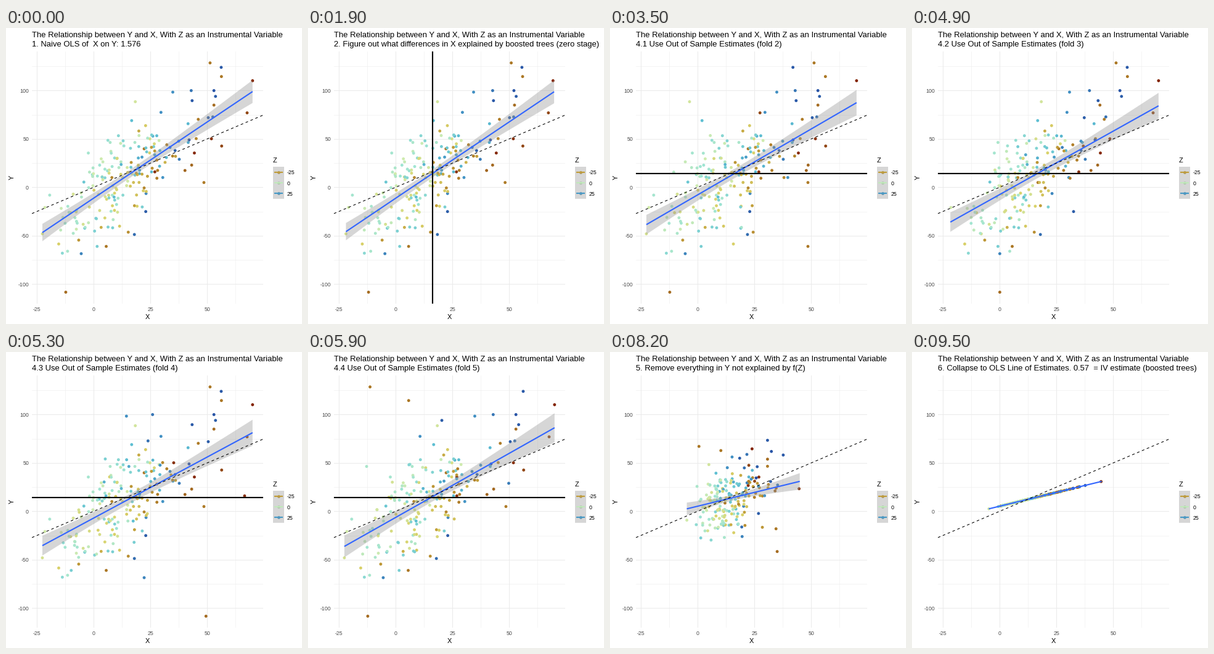
Recreate the animation shown at these times as a matplotlib script. Size 480x480 px, loop 10000 ms.

```python
import numpy as np
import matplotlib.pyplot as plt
from matplotlib.animation import FuncAnimation
from matplotlib.colors import LinearSegmentedColormap
from matplotlib.patches import Polygon, Rectangle

SIZE, DPI = 480, 96
PT = 72 / DPI  # points per pixel
FRAMES, INTERVAL = 100, 100
LEFT, RIGHT, TOP, BOTTOM = 42, 417, 38, 447
XLIM, YLIM = (-27.1, 74.66), (-120.15, 140.45)
MEAN_X, MEAN_Y = 16.2, 14.3

plt.rcParams["font.family"] = "Liberation Sans"
roma = LinearSegmentedColormap.from_list("roma", [
    "#7E1900", "#965318", "#AC7825", "#C3A23C", "#D9D26A", "#D0EBAE",
    "#A1E5D2", "#5FC0D2", "#4292C4", "#2F64AC", "#1A3399"])


def shade(z):
    return roma((np.asarray(z) + 54) / 101)


# Outlying points per fold: x, y, z, predicted x
OUTER = {
    1: [(70, 110.2, -52, 30), (53, 100, 40, 45), (-13.7, -68, 10, -1.8),
        (-6.5, -54.5, -26, 38), (46.1, 70.3, -33, 42), (-21.4, -20.8, -4, -20.6)],
    2: [(56.2, 124, 39, 42), (67.6, 77, -46, 27.5), (18.4, 88.5, -6, -3.5),
        (43.2, 23, -38, 48.7), (5.6, -61, -34, 48.6), (-15.3, -58.5, -14, 15.8),
        (18, -48.7, 35, 22), (15.3, -46.3, -28, 24.5), (16.8, 69, 17, 2)],
    3: [(53, 85, -37, 42), (56.4, 42.7, -46, 32), (-22.5, -48, -8, -4.4),
        (48.6, 5, -33, 9), (23, -25, 38, 35), (-11.4, -66, 5, 8.5),
        (50.5, 72, 38, 34)],
    4: [(43, 100, 33, 26), (34.9, 98.4, 27, 14.5), (52.5, 72.8, 34, 24),
        (51.9, 50.2, -50, 35.3), (-12.2, -108.3, -37, 49.5),
        (-5.4, -68.5, 30, 22.3), (1.6, -61, 13, -9.8), (27, 16, -50, 66.5)],
    5: [(51.3, 128.6, -34, -11.2), (56.3, 114.5, -34, 5.8), (53.7, 94, 38, 20.4),
        (43.4, 89.6, 39, 54.2), (29.7, 77.5, 27, 10.8), (44.4, 35.5, -51, 27)],
}


def make_data(total=200):
    rng = np.random.default_rng(12)
    rows = [(*p, k) for k, pts in OUTER.items() for p in pts]
    while len(rows) < total:
        z = rng.normal(0, 20)
        base = -4 + 1.2 * abs(z)
        e, u = rng.normal(0, 11), rng.normal(0, 22)
        x, y = base + e, base + 2.15 * e + u
        p = base + rng.normal(0, 8)
        inside = -20 < x < 46 and -50 < y < 66 and -14 < p < 50 and abs(z) < 45
        if inside and abs(y + 11 - 1.576 * x) < 52:
            rows.append((x, y, z, p, rng.integers(1, 6)))
    return np.array(rows).T, rng.normal(0, 1, total)


(x, y, z, pred, fold), jitter = make_data()
boosted = x + 0.06 * (MEAN_X - x) + jitter
linear = 7 + 0.567 * pred
fitted = 5.28 + 0.571 * linear


def fit(x0, y0, x1, y1, mid, end):
    """Fitted line with the band's half width at the mean and at the right end."""
    fx = np.linspace(x0, x1, 80)
    k = np.sqrt(end ** 2 - mid ** 2) / (x1 - MEAN_X)
    return np.array([fx, np.linspace(y0, y1, 80), np.hypot(mid, k * (fx - MEAN_X))])


FOLD_FITS = [
    fit(-22.5, -37, 67.6, 83, 4.9, 13.2),
    fit(-22.5, -38.5, 70, 87.5, 4.8, 13.2),
    fit(-21.4, -36, 70, 85, 4.9, 13.4),
    fit(-22.5, -35.4, 70, 81.3, 4.9, 13.4),
    fit(-22.5, -36.2, 70, 86.4, 5, 15),
]
raw_fit = fit(-22.5, -46.7, 70, 99, 4.2, 11.8)
iv_fit = fit(-4.7, 2.6, 45, 31, 5.8, 17)
flat_fit = fit(-4.7, 2.6, 45, 31, 0, 0)


def state(title, px, py, line, marks=""):
    return dict(title=title, pts=np.column_stack([px, py]), fit=line, marks=marks)


STATES = [
    state("1. Naive OLS of  X on Y: 1.576", x, y, raw_fit),
    state("2. Figure out what differences in X explained by boosted trees (zero stage)",
          x, y, raw_fit, "v"),
    state("3. Remove everything in X not explained by boosted trees (zero stage)",
          boosted, y, fit(-19, -42, 69, 98, 4.2, 12.4), "v"),
    *[state(f"4.{k} Use Out of Sample Estimates (fold {k + 1})",
            np.where(fold == k + 1, pred, x), y, FOLD_FITS[k], "h") for k in range(5)],
    state("5. Linearize", linear, y, iv_fit, "vh"),
    state("5. Remove everything in Y not explained by f(Z)", linear, fitted, flat_fit),
    state("6. Collapse to OLS Line of Estimates. 0.57  = IV estimate (boosted trees)",
          linear, fitted, flat_fit),
]
# First frame and number of steps of each move to the next state
MOVES = [(10, 2), (19, 5), (28, 2), (34, 2), (40, 2),
         (49, 5), (58, 2), (70, 2), (82, 2), (91, 1)]

fig = plt.figure(figsize=(SIZE / DPI, SIZE / DPI), dpi=DPI, facecolor="white")
ax = fig.add_axes([LEFT / SIZE, 1 - BOTTOM / SIZE,
                   (RIGHT - LEFT) / SIZE, (BOTTOM - TOP) / SIZE])
ax.set(xlim=XLIM, ylim=YLIM)
ax.axis("off")


def label(px, py, text, size, color="black", **kw):
    return fig.text(px / SIZE, 1 - py / SIZE, text, fontsize=size * PT, color=color, **kw)


def to_px(vx, vy):
    return (LEFT + (vx - XLIM[0]) / (XLIM[1] - XLIM[0]) * (RIGHT - LEFT),
            BOTTOM - (vy - YLIM[0]) / (YLIM[1] - YLIM[0]) * (BOTTOM - TOP))


def draw_grid():
    style = dict(color="#EBEBEB", zorder=0)
    for v in np.arange(-12.5, 70, 25):
        ax.axvline(v, lw=0.53 * PT, **style)
    for v in range(-75, 130, 50):
        ax.axhline(v, lw=0.53 * PT, **style)
    for v in range(-25, 51, 25):
        ax.axvline(v, lw=1.07 * PT, **style)
        label(to_px(v, 0)[0], 459, v, 8.8, "#4D4D4D", ha="center", va="baseline")
    for v in range(-100, 101, 50):
        ax.axhline(v, lw=1.07 * PT, **style)
        label(37, to_px(0, v)[1], v, 8.8, "#4D4D4D", ha="right", va="center_baseline")


def draw_legend():
    leg = fig.add_axes([0, 0, 1, 1])
    leg.set(xlim=(0, SIZE), ylim=(SIZE, 0))
    leg.axis("off")
    leg.patch.set_alpha(0)
    label(433, 218, "Z", 11, va="baseline")
    for i, v in enumerate((-25, 0, 25)):
        cy = 233.8 + 17.28 * i
        c = shade(v)
        leg.scatter([441.8], [cy], s=(4.85 * PT) ** 2, color=[c], lw=0, zorder=1)
        leg.add_patch(Rectangle((433, cy - 8.64), 17.6, 17.28, fc="#999999",
                                alpha=0.4, lw=0, zorder=2))
        leg.plot([434.8, 448.8], [cy, cy], color=c, lw=2.13 * PT,
                 solid_capstyle="butt", zorder=3)
        label(456, cy, v, 8.8, va="center_baseline")


draw_grid()
draw_legend()
label(42, 15, "The Relationship between Y and X, With Z as an Instrumental Variable",
      13, va="baseline")
label(229.5, 472, "X", 11, ha="center", va="baseline")
label(9.5, 242.5, "Y", 11, ha="center", va="center", rotation=90)
title = label(42, 30, "", 13, va="baseline")

dots = ax.scatter(x, y, s=(4.85 * PT) ** 2, c=shade(z), lw=0, zorder=2)
band = ax.add_patch(Polygon([(0, 0), (1, 1), (0, 1)], fc="#999999", alpha=0.4,
                            lw=0, zorder=3))
trend, = ax.plot([], [], color="#3366FF", lw=2.13 * PT, solid_capstyle="butt", zorder=4)
ax.plot(XLIM, XLIM, color="black", lw=1.07 * PT, dashes=(4, 4),
        dash_capstyle="butt", zorder=5)
marks = {"v": ax.axvline(MEAN_X, color="black", lw=2.13 * PT, zorder=6),
         "h": ax.axhline(MEAN_Y, color="black", lw=2.13 * PT, zorder=6)}


def locate(i):
    """Return the two states around a frame and the progress between them."""
    for k in range(len(MOVES) - 1, -1, -1):
        start, steps = MOVES[k]
        if i >= start:
            return STATES[k], STATES[k + 1], min(1, (i - start + 1) / steps)
    return STATES[0], STATES[0], 1


def update(i):
    a, b, t = locate(i)
    title.set_text((b if t >= 0.5 else a)["title"])
    dots.set_offsets(a["pts"] + (b["pts"] - a["pts"]) * t)
    fx, fy, half = a["fit"] + (b["fit"] - a["fit"]) * t
    trend.set_data(fx, fy)
    band.set_xy(np.column_stack([np.r_[fx, fx[::-1]],
                                 np.r_[fy + half, (fy - half)[::-1]]]))
    for name, line in marks.items():
        line.set_visible(name in b["marks"] and (t == 1 or name in a["marks"]))
    return dots, band, trend, title, *marks.values()


anim = FuncAnimation(fig, update, frames=FRAMES, interval=INTERVAL,
                     repeat=True, repeat_delay=0, blit=False)
plt.show()
```
